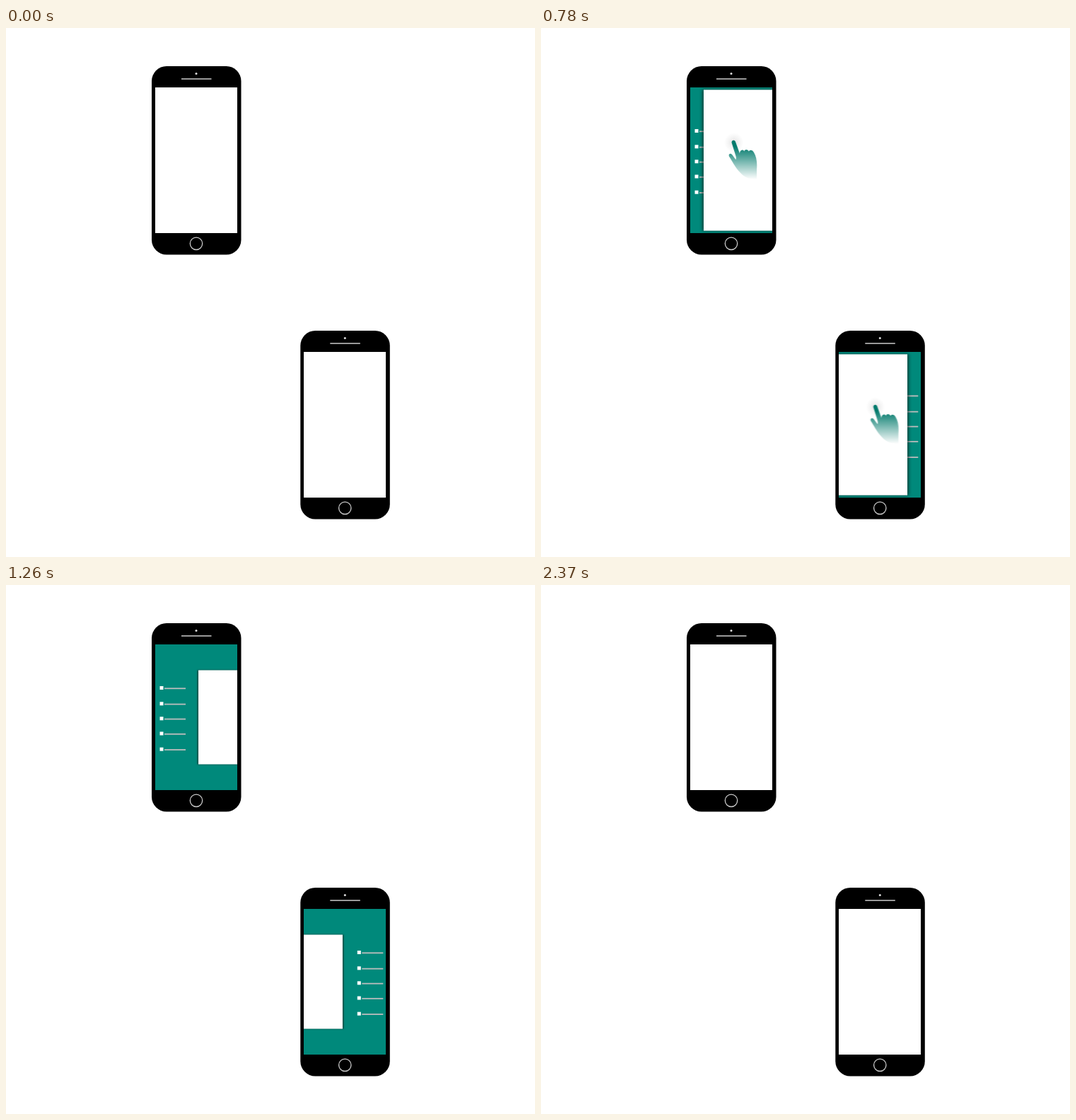
Recreate the animation shown at these times as an HTML page. Size 748x748 px, loop 2.4 s.

```html
<!DOCTYPE html>
<html lang="en">
<head>
<meta charset="utf-8">
<title>Swipe menus</title>
<style>
  html, body { margin: 0; width: 100%; height: 100%; overflow: hidden; background: #fff; }
  svg { display: block; width: 100vw; height: 100vh; }

  .left  { --card: 40.5px;  --drag: 40.5px;  --cast: -2px; }
  .right { --card: -40.5px; --drag: -67.5px; --cast: 2px; }

  .card, .hand, .glow { animation: 2400ms linear infinite; }
  .card {
    fill: #fff;
    transform-box: fill-box;
    transform-origin: center;
    filter: drop-shadow(var(--cast) 0 2px rgba(0, 0, 0, .55));
    animation-name: slide, shrink;
  }
  .hand { animation-name: drag, show; }
  .glow { animation-name: press; }

  /* open 625-1235 ms, close 2140-2370 ms */
  @keyframes slide {
    0%, 26.04% { translate: 0; animation-timing-function: ease; }
    51.46% { translate: var(--card); }
    89.17% { translate: var(--card); animation-timing-function: ease; }
    98.75%, 100% { translate: 0; }
  }
  @keyframes shrink {
    0%, 28.12% { scale: 1; animation-timing-function: ease-in-out; }
    48.96% { scale: .646; }
    89.17% { scale: .646; animation-timing-function: ease; }
    98.75%, 100% { scale: 1; }
  }
  @keyframes drag {
    0%, 26.04% { translate: 0; animation-timing-function: ease; }
    51.46%, 100% { translate: var(--drag); }
  }
  @keyframes show {
    0%, 16.67% { opacity: 0; }
    23.75%, 43.75% { opacity: 1; }
    51.25%, 100% { opacity: 0; }
  }
  @keyframes press {
    0%, 18% { opacity: 0; }
    23.75%, 33% { opacity: 1; }
    41%, 100% { opacity: 0; }
  }
</style>
</head>
<body>
<svg viewBox="0 0 748 748">
  <defs>
    <clipPath id="screen"><rect x="211" y="84" width="116" height="206"/></clipPath>

    <linearGradient id="skin" gradientUnits="userSpaceOnUse" x1="0" y1="167" x2="0" y2="214">
      <stop offset="0" stop-color="#00796b"/>
      <stop offset="1" stop-color="#00796b" stop-opacity="0"/>
    </linearGradient>
    <radialGradient id="halo">
      <stop offset="0" stop-color="#000" stop-opacity=".11"/>
      <stop offset=".5" stop-color="#000" stop-opacity=".05"/>
      <stop offset="1" stop-color="#000" stop-opacity="0"/>
    </radialGradient>

    <g id="body">
      <rect x="206" y="54" width="126.5" height="266.5" rx="21"/>
      <circle cx="269" cy="64.5" r="1.5" fill="#ddd"/>
      <path d="M248 72H290.5" stroke="#ccc" stroke-width="1.4"/>
      <circle cx="269" cy="304.8" r="8.7" fill="none" stroke="#ccc" stroke-width="1.3"/>
    </g>

    <g id="item">
      <rect x="217.5" y="143" width="5" height="5" fill="#fff"/>
      <rect x="224" y="145.4" width="30" height="1.8" fill="#bdbdbd"/>
    </g>
    <g id="menu">
      <use href="#item"/>
      <use href="#item" y="22.3"/>
      <use href="#item" y="43.3"/>
      <use href="#item" y="64.5"/>
      <use href="#item" y="86.7"/>
    </g>

    <path id="fingers" fill="url(#skin)" d="M252.6 162.2C252 158.4 256.5 157.4 257.8 160.6L264 177.5
      C263.8 172 269.3 171.2 270.2 174.4C271.2 171 275.8 171.2 276.8 174.6C278.3 171.4 282.4 172.6 284 176
      C287.5 182 289 190 288 200L288 214C280 214.5 272 212 266.5 206.5C258.5 199 255.5 192 248.9 181.6
      C247.6 177.6 251.4 176.6 253.5 179.4L258.4 186.2C259 184.8 259 183 258.4 181Z"/>
  </defs>

  <g class="left">
    <use href="#body"/>
    <g clip-path="url(#screen)">
      <rect x="211" y="84" width="116" height="206" fill="#00897b"/>
      <use href="#menu"/>
      <rect class="card" x="211" y="84" width="116" height="206"/>
      <g class="hand">
        <circle class="glow" cx="255.5" cy="162" r="14" fill="url(#halo)"/>
        <use href="#fingers"/>
      </g>
    </g>
  </g>

  <g class="right" transform="translate(210 374)">
    <use href="#body" x=".3"/>
    <g clip-path="url(#screen)">
      <rect x="211" y="84" width="116" height="206" fill="#00897b"/>
      <use href="#menu" x="69.3"/>
      <rect class="card" x="211" y="84" width="116" height="206"/>
      <g class="hand">
        <g transform="translate(35.7 0)">
          <circle class="glow" cx="255.5" cy="162" r="14" fill="url(#halo)"/>
          <use href="#fingers"/>
        </g>
      </g>
    </g>
  </g>
</svg>
</body>
</html>
```
